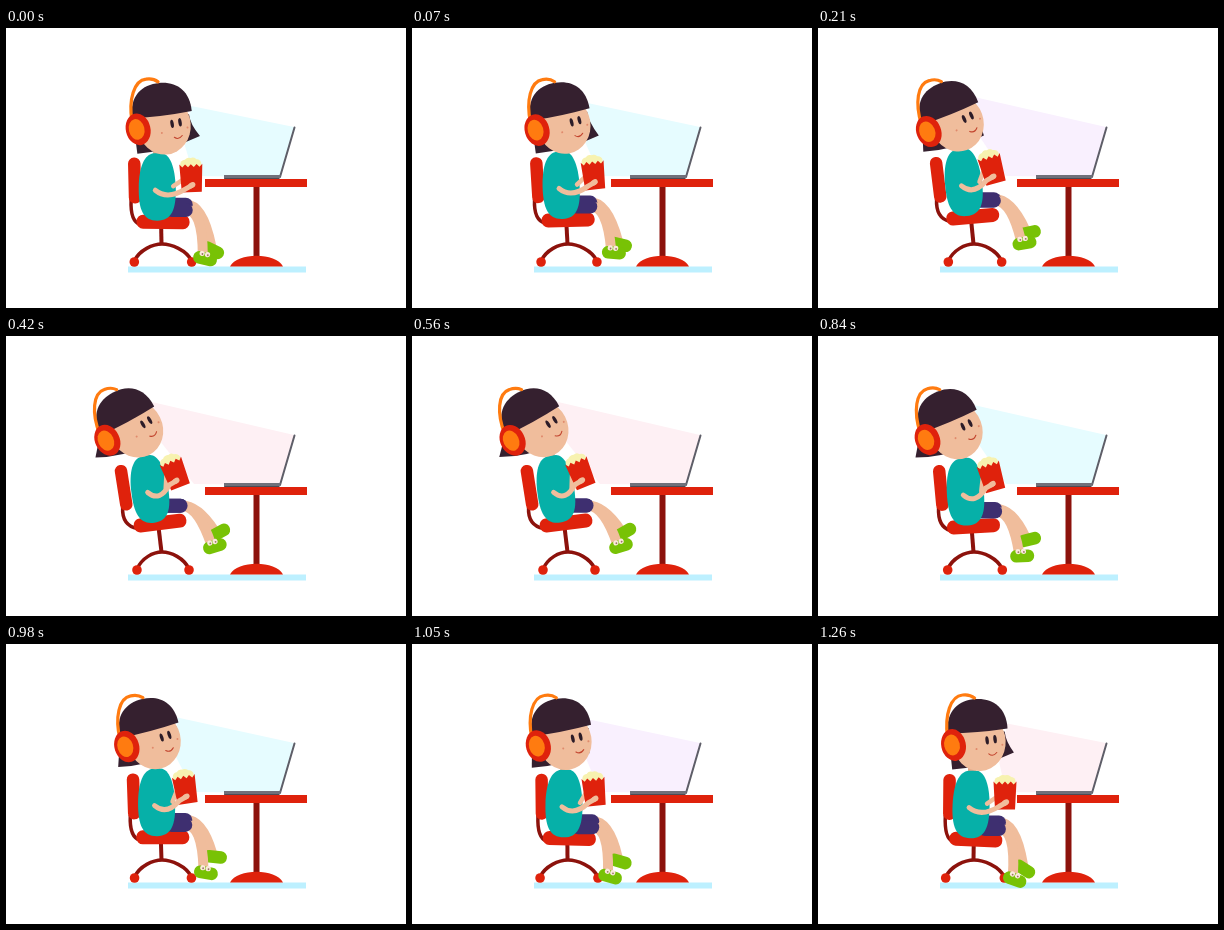
An HTML page with a canvas that plays this animation: 400x280 px, repeating every 1.33 s.

```html
<!DOCTYPE html>
<html lang="en">
<head>
<meta charset="utf-8">
<title>Movie time</title>
<style>
html, body { margin: 0; width: 100%; height: 100%; overflow: hidden; background: #fff; }
canvas { display: block; width: 400px; height: 280px; }
</style>
</head>
<body>
<canvas id="stage"></canvas>
<script>
const canvas = document.getElementById('stage');
const c = canvas.getContext('2d');
const ratio = window.devicePixelRatio || 1;
canvas.width = 400 * ratio;
canvas.height = 280 * ratio;

const LOOP = 1330, STEP = 70, FORWARD = 630, UPRIGHT = 1260;
const RED = '#df220c', DARK = '#8c120c', SKIN = '#f0bd9c', HAIR = '#35202f',
      TEAL = '#06b0a8', ORANGE = '#ff7b10', GREEN = '#78c205', PURPLE = '#3e2f70';
const GLOW = ['#e6fcff', '#f9f0fe', '#fef0f4', '#f0fff5'];

const smooth = u => u * u * (3 - 2 * u);

// 0 sitting upright, 1 leaning back: a quick start backwards, an even return.
function lean(time) {
  const t = (time + LOOP) % LOOP;
  if (t >= FORWARD && t < UPRIGHT) return 1 - smooth((t - FORWARD) / (UPRIGHT - FORWARD));
  const u = ((t - UPRIGHT + LOOP) % LOOP) / (LOOP - UPRIGHT + FORWARD);
  return smooth(1 - (1 - u) ** 2);
}

const mix = (from, to, k) => from.map((v, i) => v + (to[i] - v) * k);

function place([x, y, turn], px, py) {
  const a = turn * Math.PI / 180, s = Math.sin(a), k = Math.cos(a);
  return [x + px * k - py * s, y + px * s + py * k];
}

function at([x, y, turn = 0], draw) {
  c.save();
  c.translate(x, y);
  c.rotate(turn * Math.PI / 180);
  draw();
  c.restore();
}

function fill(path, color) {
  c.fillStyle = color;
  c.fill(new Path2D(path));
}

function line(path, color, width, cap = 'round') {
  c.strokeStyle = color;
  c.lineWidth = width;
  c.lineCap = cap;
  c.stroke(new Path2D(path));
}

function oval(x, y, rx, ry, color, turn = 0) {
  c.fillStyle = color;
  c.beginPath();
  c.ellipse(x, y, rx, ry, turn * Math.PI / 180, 0, 7);
  c.fill();
}

function pill(w, h, r, color) {
  c.fillStyle = color;
  c.beginPath();
  c.roundRect(-w / 2, -h / 2, w, h, r);
  c.fill();
}

function beam(head, color) {
  fill(`M${place(head, 30, -4)}L288 99L274 149L188 148L${place(head, 20, 35)}Z`, color);
}

function room() {
  fill('M122 238.5H300V244.5H122Z', '#bdf0ff');
  fill('M247.5 158H253.5V229H247.5Z', DARK);
  fill('M224 238.5C231 224 270 224 277 238.5Z', RED);
  fill('M199 151H301V159H199Z', RED);
  line('M274 149L288.5 99.5', '#5e5e68', 2);
  fill('M218 147H275L273 151H218Z', '#70707a');
  line('M219 150.5H273', '#4c4c56', 1);
}

function chair(seat, k) {
  const [x, y, turn] = seat, mid = 157, w = 29.5 - 3.5 * k;
  const back = [...place(seat, -26.5 - 4 * k, -42.5 + 2 * k), turn];
  line(`M${x - 2} ${y}L155.5 216`, DARK, 4, 'butt');
  line(`M${mid - w} 233C${mid - w + 5} 222 147 216 156 216S${mid + w - 5} 222 ${mid + w} 233`, DARK, 3.5);
  for (const side of [-w, w]) oval(mid + side, 234, 4.8, 4.8, RED);
  const low = place(back, -4, 19), end = place(seat, -23, 2);
  line(`M${low}Q${low[0] - 1} ${end[1] - 3} ${end}`, DARK, 3.5);
  at(back, () => pill(12.5, 46, 6, RED));
  at([x, y, turn + 2], () => pill(53, 14, 6.5, RED));
}

function leg([x, y], foot) {
  line(`M${x} ${y}Q${x + 17} ${y - 1} ${place(foot, -3, -3)}`, SKIN, 10);
  at(foot, () => pill(24, 12.5, 6, GREEN));
}

function shorts([x, y]) {
  line(`M${x - 14} ${y}H${x}`, PURPLE, 14);
}

function legs(seat, far, near, k) {
  const [x, y] = place(seat, 23, -14), gap = 3.5 * (1 - k);
  const farKnee = [x, y - gap], nearKnee = [x, y + gap];
  leg(farKnee, far);
  shorts(farKnee);
  leg(nearKnee, near);
  shorts(nearKnee);
  at(near, () => {
    for (const eye of [-4, 1.5]) {
      oval(eye, -4.5, 2.6, 2.6, '#fbe9dc');
      oval(eye + 0.4, -4, 0.9, 0.9, '#9a7765');
    }
  });
}

function torso(pose) {
  at(pose, () => {
    line('M0 -40V-31', '#e3a98a', 8);
    fill('M-3 -34H5C13 -33 18 -20 18.5 0C19 23 14 33.5 0 33.5C-14 33.5 -19 23 -18.5 0C-18 -20 -13 -33 -3 -34Z', TEAL);
  });
}

function popcorn([tx, ty], bag) {
  const [bx, by] = bag;
  line(`M${tx + 16} ${ty - 1}L${bx - 9} ${by + 2}`, SKIN, 4.5);
  at(bag, () => {
    for (let x = -6; x <= 6; x += 4) oval(x, -17 + Math.abs(x) / 2, 4.6, 4.6, '#f7f2b0');
    let top = 'M-11.5 -14';
    for (let i = 1; i <= 8; i++) top += `L${-11.5 + i * 23 / 8} ${i % 2 ? -11 : -14}`;
    fill(top + 'L10 14H-10Z', RED);
  });
  line(`M${tx - 2} ${ty + 3}Q${tx + 10} ${ty + 13} ${bx - 6} ${by + 11}L${bx + 1} ${by + 7}`, SKIN, 5);
  oval(bx + 0.5, by + 7, 3.8, 2.8, SKIN, -30);
}

function backHair([x, y, turn], swing) {
  const left = place([0, 0, turn], -29.5, 0), right = place([0, 0, turn], 27, 4);
  const lx = -24 - 9 * swing, ly = 41 - 3 * swing, rx = 39 - 18 * swing, ry = 23 + 3 * swing;
  at([x, y], () => fill(
    `M${left}L${lx} ${ly}Q${(lx + rx) / 2} ${(ly + ry) / 2 + 6} ${rx} ${ry}Q${right[0] + 1} ${right[1] + 10} ${right}Z`, HAIR));
}

function head(pose, k) {
  at(pose, () => {
    at([3 * k, 0], () => {
      oval(1, 13, 26.5, 29, SKIN);
      for (const x of [9, 17]) oval(x, 12.8 - x / 10, 1.7, 4.2, '#2c1c28', -4);
      line('M10 25.5Q14 29 18 24.5', '#c2442e', 1.1);
      oval(-2, 20, 1, 1, '#e08a6c');
      oval(24, 17, 1, 1, '#e08a6c');
    });
    fill('M-30 3C-31 -20 -17 -30 0 -30S30 -20 30 1Q0 4 -30 3Z', HAIR);
  });
  at([pose[0], pose[1], -14 * k], () => {
    line('M-30 8C-33 -14 -27 -33 -15 -34Q-8 -35 -3 -31', ORANGE, 3.2);
    oval(-24, 16, 12.3, 16, RED, -12);
    oval(-25.5, 16, 7.8, 10.5, ORANGE, -12);
  });
}

function draw(t) {
  // The seat and near foot lead the head; the loose hair trails it.
  const k = lean(t), lead = lean(t + 50), swing = lean(t - 150);
  const face = mix([159.5, 85, -3], [120, 83, -27], k);
  const bag = mix([187, 151.5, 0], [169, 137.5, -22], k);
  const far = mix([206, 225, 32], [213, 196, -30], k);
  const near = mix([196, 237, 22], [209, 210, -17], lead);
  const seat = mix([158, 196, 1], [154, 187, -9], lead);
  const chest = [...place(seat, -5, -34.8), seat[2] + 1];

  c.setTransform(ratio, 0, 0, ratio, 0, 0);
  c.fillStyle = '#fff';
  c.fillRect(0, 0, 400, 280);
  beam(face, GLOW[Math.floor(t / STEP / 3) % 4]);
  room();
  chair(seat, lead);
  legs(seat, far, near, lead);
  torso(chest);
  popcorn(chest, bag);
  backHair(face, swing);
  head(face, k);
}

const start = performance.now();
function tick() {
  const t = (performance.now() - start) % LOOP;
  draw(Math.floor(t / STEP) * STEP);
  requestAnimationFrame(tick);
}
tick();
</script>
</body>
</html>
```
